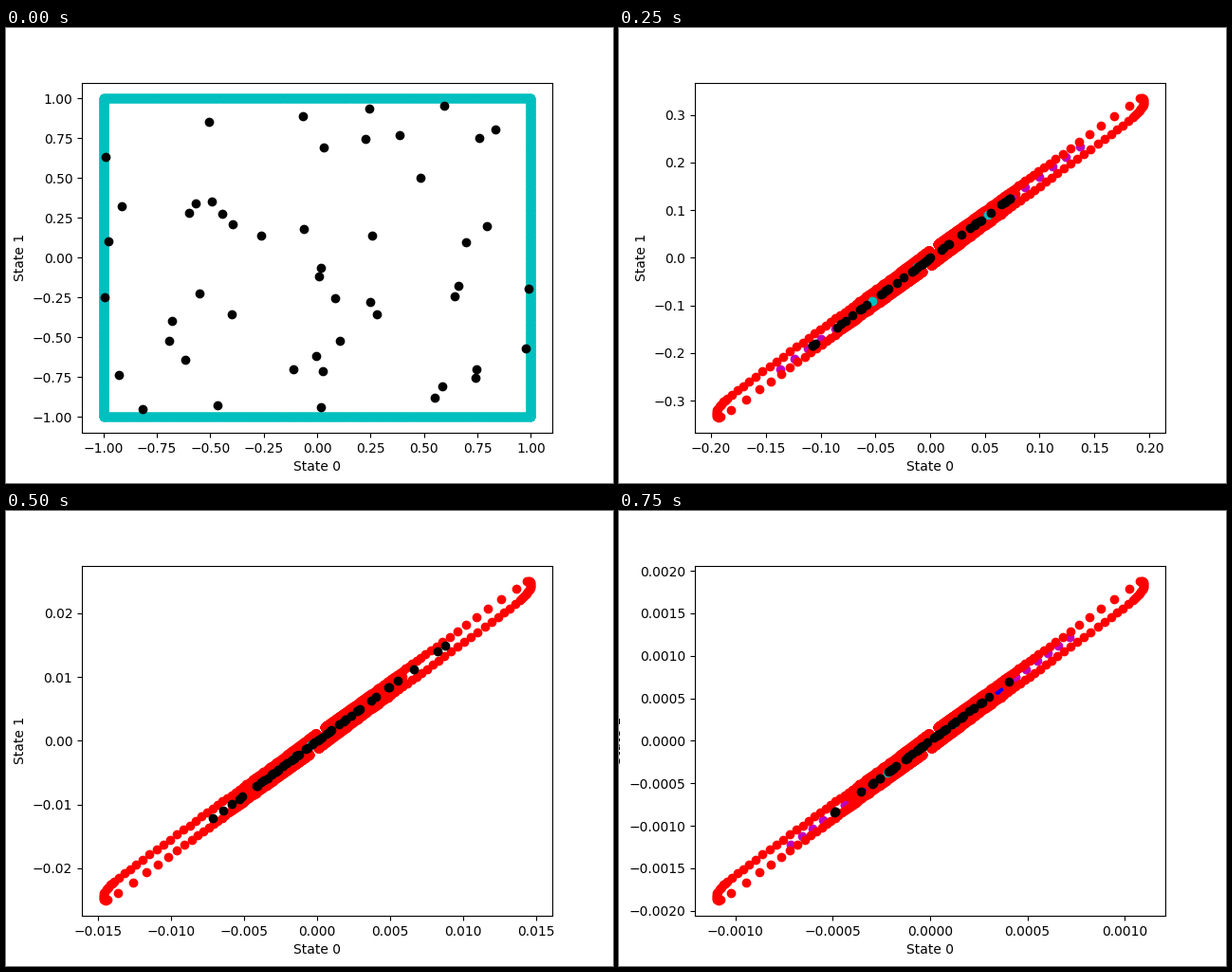
Write a matplotlib script that moves like this. It is 640x480 px and loops after 1000 ms.

```python
import numpy as np
import matplotlib.pyplot as plt
from matplotlib.animation import FuncAnimation

N_STATES = 50
SLOPE, HALF_BAND = 0.975, 0.05  # band axis and half height in the unit box

# Largest state values after each step, and where the nested sets show through
STEPS = [
    dict(xmax=0.1952, ymax=0.334, magenta=(0.38, 0.70), cyan=(-0.27, -0.06, 0.27)),
    dict(xmax=0.01464, ymax=0.02497, cyan=(-0.10, -0.03)),
    dict(xmax=0.001098, ymax=0.001874, magenta=(0.40, 0.65), blue=0.32,
         cyan=(-0.20, -0.10, 0.11)),
]


def square(n=600):
    t = np.linspace(-1, 1, n)
    one = np.ones(n)
    return np.concatenate([t, t, one, -one]), np.concatenate([one, -one, t, t])


def band():
    """Thin slanted band with rounded tips, symmetric about the origin."""
    k = np.arange(300)
    top = 1 / (1.074 + 0.09 * k)
    bottom = 1 / (1.02 + 0.012 * k + 0.0025 * k**2)
    side = np.linspace(-0.8, 0.89, 14)
    tip = (1 - side**2) ** (1 / np.where(side > 0, 77, 25))
    u = np.concatenate([top, tip, bottom])
    s = np.concatenate([np.sqrt(1 - top**77), side, -np.sqrt(1 - bottom**25)])
    v = SLOPE * u + HALF_BAND * s
    return np.concatenate([u, -u]), np.concatenate([v, -v])


def on_axis(u):
    u = np.asarray(u, float)
    return u, (SLOPE + 0.025) * u


def mirrored(u):
    return on_axis(np.concatenate([u, -u]))


def draw(i):
    ax.clear()
    rng = np.random.default_rng(7 + i)
    if i == 0:
        xmax = ymax = 1
        layers = [(square(), "c"), (rng.uniform(-1, 1, (2, N_STATES)), "k")]
    else:
        step = STEPS[i - 1]
        xmax, ymax = step["xmax"], step["ymax"]
        layers = [(on_axis(np.linspace(-0.4, 0.4, 80)), "r")]
        if "blue" in step:
            layers.append((mirrored(np.array([step["blue"]])), "b"))
        if "magenta" in step:
            layers.append((mirrored(np.linspace(*step["magenta"], 6)), "m"))
        states = np.clip(rng.normal(0, 0.24, N_STATES), -0.55, 0.6)
        layers += [(band(), "r"), (on_axis(step["cyan"]), "c"),
                   (on_axis(states), "k")]
    for (u, v), color in layers:
        ax.scatter(u * xmax, v * ymax, color=color)
    ax.set_xlim(-1.1 * xmax, 1.1 * xmax)
    ax.set_ylim(-1.1 * ymax, 1.1 * ymax)
    ax.set_xlabel("State 0")
    ax.set_ylabel("State 1")


fig, ax = plt.subplots(figsize=(6.4, 4.8), dpi=100)
anim = FuncAnimation(fig, draw, frames=4, init_func=lambda: None,
                     interval=250, repeat=True, repeat_delay=0)
plt.show()
```
